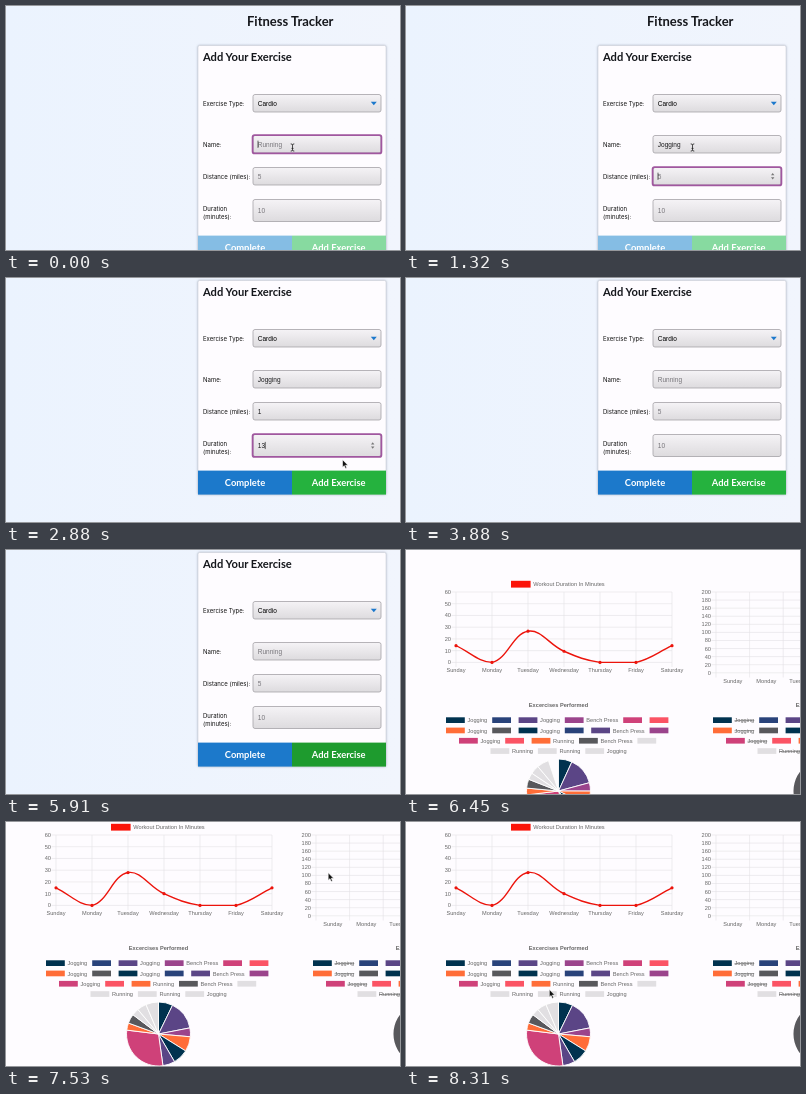
Animation of 394x244 px, one loop 8370 ms. Source, as an HTML page:

```html
<!DOCTYPE html>
<html lang="en">
<head>
<meta charset="utf-8">
<title>Fitness Tracker</title>
<style>
  html, body { margin: 0; width: 100%; height: 100%; overflow: hidden; background: #fefcff; }
  svg { display: block; width: 394px; height: 244px; }
  text { font-family: "Liberation Sans", Arial, sans-serif; white-space: pre; }
  .head, .btn { font-family: Lato, sans-serif; font-weight: 700; }
  .head { fill: #15171c; }
  .btn { font-size: 9.4px; fill: #fff; text-anchor: middle; }
  .label { font-family: Inter, sans-serif; font-size: 6px; fill: #111; }
  .value { font-size: 6.5px; }
  .tick { font-size: 5.65px; fill: #666; }
  .mid { text-anchor: middle; }
  .end { text-anchor: end; }
  .bold { font-weight: 700; }
  .struck { text-decoration: line-through; }
  .grid { stroke: #e3e1e4; stroke-width: .6; fill: none; }
  .card { fill: #fefcff; stroke: #cdd0d8; stroke-width: .6; filter: drop-shadow(0 .6px 1.2px rgba(40, 50, 80, .3)); }
</style>
</head>
<body>
<svg viewBox="0 0 394 244">
  <defs>
    <linearGradient id="field" x2="0" y2="1">
      <stop stop-color="#f5f3f6"/><stop offset="1" stop-color="#dddbde"/>
    </linearGradient>
    <linearGradient id="sky">
      <stop stop-color="#ebf3fe"/><stop offset="1" stop-color="#f1f5fd"/>
    </linearGradient>
  </defs>
  <g id="formPage">
    <rect width="394" height="244" fill="url(#sky)"/>
    <g id="form"></g>
  </g>
  <g id="statsPage">
    <rect width="394" height="244" fill="#fefcff"/>
    <g id="stats"></g>
  </g>
  <path id="ibeam" d="M-1.8-3.6Q0-3.6 0-2.6Q0-3.6 1.8-3.6M0-2.6V2.6M-1.8 3.6Q0 3.6 0 2.6Q0 3.6 1.8 3.6M-1 .9H1"
        fill="none" stroke="#222" stroke-width=".8"/>
  <path id="arrow" d="M0 0V7.6L1.8 6L3 8.9L4.3 8.3L3.1 5.6H5.5Z" fill="#111" stroke="#fff" stroke-width=".6"/>
</svg>
<script>
const LOOP = 8370;
const $ = id => document.getElementById(id);
const clamp = v => Math.min(1, Math.max(0, v));
const smooth = v => v * v * (3 - 2 * v);
const span = (t, a, b) => clamp((t - a) / (b - a));
const text = (x, y, s, cls, more = '') => `<text x="${x}" y="${y}" class="${cls}" ${more}>${s}</text>`;
const rect = (x, y, w, h, fill, more = '') =>
  `<rect x="${x}" y="${y}" width="${w}" height="${h}" fill="${fill}" ${more}/>`;

// Moves through [time, x, y] stops with eased legs.
function along(stops, t) {
  let i = 0;
  while (i < stops.length - 2 && t > stops[i + 1][0]) i++;
  const [a, b] = [stops[i], stops[i + 1]];
  const k = smooth(span(t, a[0], b[0]));
  return [a[1] + (b[1] - a[1]) * k, a[2] + (b[2] - a[2]) * k];
}
const place = (el, [x, y]) => el.setAttribute('transform', `translate(${x} ${y})`);
const show = (el, on) => el.setAttribute('visibility', on ? 'visible' : 'hidden');
const mix = (a, b, k) => `rgb(${a.map((v, i) => Math.round(v + (b[i] - v) * k))})`;

// ---------- Form ----------
const RESET = 3120;
const fields = [
  { id: 'name', y: 129.5, h: 17.5, hint: 'Running', value: 'Jogging', keys: i => 240 + i * 95, focus: [0, 1080] },
  { id: 'dist', y: 161.5, h: 17.5, hint: '5', value: '1', keys: () => 1440, focus: [1080, 1740], spin: true },
  { id: 'dur', y: 193.5, h: 22, hint: '10', value: '13', keys: i => 1980 + i * 360, focus: [1740, 3060], spin: true }
];
const box = (y, h) => rect(247, y, 128, h, 'url(#field)', 'rx="2" stroke="#a5a3a8" stroke-width=".8"');

$('form').innerHTML =
  text(241, 20.2, 'Fitness Tracker', 'head', 'font-size="13"') +
  '<rect class="card" x="192" y="39.5" width="188" height="214" rx="1.5"/>' +
  text(197, 55.4, 'Add Your Exercise', 'head', 'font-size="11.15"') +
  text(197, 100, 'Exercise Type:', 'label') +
  text(197, 141, 'Name:', 'label') +
  text(197, 173, 'Distance (miles):', 'label') +
  text(197, 204.6, 'Duration', 'label') +
  text(197, 213.4, '(minutes):', 'label') +
  box(88.5, 17.5) + text(251.8, 99.7, 'Cardio', 'value') +
  '<path d="M364.8 95.8H370.8L367.8 99.2Z" fill="#1c78cc"/>' +
  fields.map(f => {
    const mid = f.y + f.h / 2;
    return box(f.y, f.h) +
      `<rect id="${f.id}Ring" x="246.6" y="${f.y - .4}" width="128.8" height="${f.h + .8}" rx="2" fill="none" stroke="#a0579f" stroke-width="1.8"/>` +
      text(251.8, mid + 2.4, '', 'value', `id="${f.id}Text"`) +
      `<path id="${f.id}Caret" d="M0 ${mid - 3.6}v7.2" stroke="#222" stroke-width=".7"/>` +
      `<path id="${f.id}Spin" d="M365 ${mid - 1}l1.7-2.2l1.7 2.2zM365 ${mid + 1}l1.7 2.2l1.7-2.2z" fill="#777"/>`;
  }).join('') +
  rect(192, 229.6, 94, 24, '', 'id="done"') + rect(286, 229.6, 94, 24, '', 'id="add"') +
  text(239, 245.3, 'Complete', 'btn') + text(332.7, 245.3, 'Add Exercise', 'btn');

const BLUE = [28, 121, 203], PALE_BLUE = [133, 189, 228];
const GREEN = [37, 178, 62], PALE_GREEN = [135, 218, 160], DARK_GREEN = [30, 155, 46];

const formCursor = [[0, 286.5, 141.5], [1900, 286.5, 141.5], [2400, 339.5, 138.3],
  [2720, 339.5, 138.3], [2980, 335, 203], [3300, 335, 203]];

function drawForm(t) {
  place($('form'), [0, -37 * smooth(span(t, 2550, 2720))]);
  for (const f of fields) {
    const typed = t < RESET ? [...f.value].filter((c, i) => t >= f.keys(i)).join('') : '';
    const label = $(f.id + 'Text');
    const focused = t >= f.focus[0] && t < f.focus[1];
    label.textContent = typed || f.hint;
    label.setAttribute('fill', typed ? '#1c1c1e' : '#77757a');
    show($(f.id + 'Ring'), focused);
    show($(f.id + 'Caret'), focused);
    show($(f.id + 'Spin'), focused && f.spin);
    place($(f.id + 'Caret'), [252 + (typed ? label.getComputedTextLength() : 0), 0]);
  }
  const ready = span(t, 1980, 2080);
  const hover = t < 5900 ? span(t, 2920, 3020) - span(t, 3600, 3870) : 1;
  $('done').setAttribute('fill', mix(PALE_BLUE, BLUE, ready));
  $('add').setAttribute('fill', hover > 0 ? mix(GREEN, DARK_GREEN, hover) : mix(PALE_GREEN, GREEN, ready));
}

// ---------- Charts ----------
const DAYS = ['Sunday', 'Monday', 'Tuesday', 'Wednesday', 'Thursday', 'Friday', 'Saturday'];
const MINUTES = [15, 0, 28, 10, 0, 0, 15];
const INK = ['#00324f', '#29427a', '#5b4586', '#9b448c', '#cf4179', '#fb5364', '#ff6d38', '#58585c'];
const LIGHT = '#e1dfe2';
const J = 'Jogging', R = 'Running', B = 'Bench Press';
const LEGEND = [
  [40, J, '', J, B, '', ''],
  [40, J, '', J, '', B, ''],
  [53, J, '', R, B, ''],
  [84.5, R, R, J]
];
const WIDTH = { '': 0, [J]: 19.8, [R]: 21, [B]: 32 };
// Palette index and end angle of each slice.
const SLICES = [[0, 26], [2, 79], [3, 95], [6, 122], [0, 150], [2, 172], [4, 277], [6, 290], [7, 307],
  [8, 320], [8, 337], [8, 360]];
const BASE = 83.4, LINE_H = 70.4;

function lineGrid() {
  let d = '', s = '';
  for (let i = 0; i <= 6; i++) {
    const y = BASE - i * LINE_H / 6, x = 50 + i * 36;
    d += `M45.5 ${y}H266M${x} 13V88`;
    s += text(45, y + 2, i * 10, 'tick end') + text(x, 93, DAYS[i], 'tick mid');
  }
  return `<path class="grid" d="${d}"/>` + s;
}
function barGrid() {
  let d = '', s = '';
  for (let i = 0; i <= 10; i++) {
    const y = 93.8 - i * 8.08;
    d += `M305.5 ${y}H394`;
    s += text(305, y + 2, i * 20, 'tick end');
  }
  for (let i = 0; i < 3; i++) {
    const x = 310 + i * 33.6;
    d += `M${x} 13V98.5`;
    s += text(x + 16.8, 104, DAYS[i], 'tick mid');
  }
  return `<path class="grid" d="${d}"/>` + s;
}
function legend(dx, cls) {
  let n = 0, s = text(152.5 + dx, 127.5, 'Excercises Performed', 'tick mid bold');
  LEGEND.forEach(([x, ...names], row) => {
    const y = 141.2 + row * 10.3;
    for (const name of names) {
      s += rect(x + dx, y - 2.9, 18.8, 5.7, n < 16 ? INK[n % 8] : LIGHT);
      s += text(x + dx + 21.5, y + 2, name, 'tick ' + cls);
      x += 26.4 + WIDTH[name];
      n++;
    }
  });
  return s;
}
$('stats').innerHTML =
  rect(105, 1.8, 19.6, 6.8, '#fb1409') + text(127.3, 7.4, 'Workout Duration In Minutes', 'tick') +
  lineGrid() + barGrid() + legend(0, '') + legend(267, 'struck') +
  '<path id="line" fill="none" stroke="#ec140c" stroke-width="1.4"/>' +
  '<path id="dots" stroke="#ec140c" stroke-width="3.2" stroke-linecap="round"/>' +
  '<g id="pie" stroke="#fff" stroke-width=".9" stroke-linejoin="bevel"></g><path id="ring" fill="#58585c"/>';

function sector(cx, cy, r, from, to) {
  const at = deg => {
    const a = (deg - 90) * Math.PI / 180;
    return `${(cx + r * Math.cos(a)).toFixed(2)} ${(cy + r * Math.sin(a)).toFixed(2)}`;
  };
  return `M${cx} ${cy}L${at(from)}A${r} ${r} 0 ${to - from > 180 ? 1 : 0} 1 ${at(to)}Z`;
}

// Spline with tension .4, handles kept inside the plot area.
function linePath(pts) {
  const hold = y => Math.min(BASE, Math.max(BASE - LINE_H, y));
  const handles = pts.map((p, i) => {
    const a = pts[i - 1] || p, b = pts[i + 1] || p;
    const da = Math.hypot(p[0] - a[0], p[1] - a[1]), db = Math.hypot(b[0] - p[0], b[1] - p[1]);
    const fa = .4 * da / (da + db), fb = .4 * db / (da + db);
    const [vx, vy] = [b[0] - a[0], b[1] - a[1]];
    return [[p[0] - fa * vx, hold(p[1] - fa * vy)], [p[0] + fb * vx, hold(p[1] + fb * vy)]];
  });
  return 'M' + pts[0] + pts.slice(1).map((p, i) => `C${handles[i][1]} ${handles[i + 1][0]} ${p}`).join('');
}

const statsCursor = [[7150, 398, 96], [7560, 321, 50], [8000, 168, 206], [8290, 143.3, 167.5], [8370, 143.3, 167.5]];

function drawStats(t) {
  const grow = 1 - (1 - span(t, 5925, 6925)) ** 4;
  place($('stats'), [0, 29 * (1 - smooth(span(t, 6450, 6750)))]);
  const pts = MINUTES.map((m, i) => [50 + i * 36, BASE - m / 60 * LINE_H * grow]);
  $('line').setAttribute('d', linePath(pts));
  $('dots').setAttribute('d', pts.map(p => `M${p}h.01`).join(''));
  let from = 0;
  $('pie').innerHTML = SLICES.map(([c, to]) => {
    const d = sector(152.5, 212, 32, from * grow, to * grow);
    from = to;
    return `<path d="${d}" fill="${INK[c] || LIGHT}"/>`;
  }).join('');
  $('ring').setAttribute('d', sector(419.5, 212, 32, 0, 359.9 * grow));
}

// ---------- Loop ----------
let start;
function frame(now) {
  start ??= now;
  const t = (now - start) % LOOP;
  const onForm = t < 5970;
  $('formPage').style.display = onForm ? '' : 'none';
  $('statsPage').style.display = onForm ? 'none' : '';
  onForm ? drawForm(t) : drawStats(t);
  const pos = along(onForm ? formCursor : statsCursor, t);
  place($('ibeam'), pos);
  place($('arrow'), pos);
  show($('ibeam'), t < 2760);
  show($('arrow'), t >= 2760 && t < 3300 || t >= 7150);
  requestAnimationFrame(frame);
}
requestAnimationFrame(frame);
</script>
</body>
</html>
```
